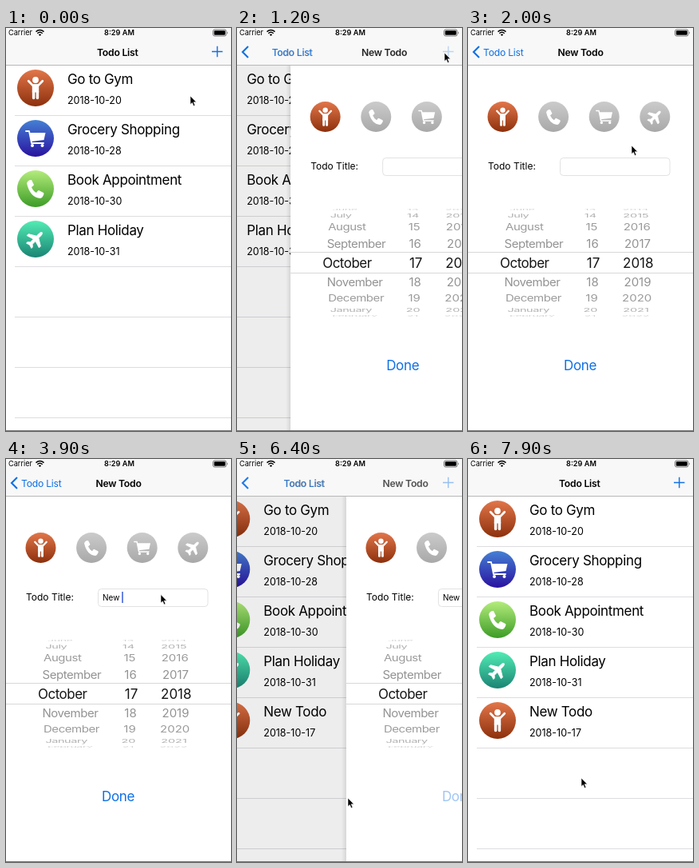
An HTML page that plays this animation: 282x504 px, repeating every 8 s.

```html
<!DOCTYPE html>
<html lang="en">
<head>
<meta charset="utf-8">
<title>Todo List</title>
<style>
  html, body { margin: 0; height: 100%; overflow: hidden; background: #fff; }
  svg { display: block; width: 100vw; height: 100vh; }
  text { font-family: Inter, Roboto, sans-serif; letter-spacing: -.02em; white-space: pre; }
  .plain { letter-spacing: 0; }
  .bold { font-weight: 600; }
  .mid { text-anchor: middle; }
</style>
</head>
<body>
<svg id="stage" viewBox="0 0 282 504"></svg>
<script>
const BLUE = '#0f70e4';
const WIDTH = 282;

const gradients = {
  person: ['#e2764a', '#8c300c'],
  cart: ['#4480d4', '#2a12a0'],
  phone: ['#b4ec7c', '#3c9c26'],
  plane: ['#52ecb4', '#1a8474'],
  gray: ['#cbcbcb', '#a8a8a8']
};

const glyphs = {
  person: `<circle cy="-10" r="3.9"/>
    <path d="M-8.8-8.8L-3.6-3.4H3.6L8.8-8.8" fill="none" stroke="#fff" stroke-width="2.8" stroke-linecap="round" stroke-linejoin="round"/>
    <path d="M-4.2-4.5h8.4v10h-8.4z"/>
    <path d="M-2.4 4v8.6M2.4 4v8.6" stroke="#fff" stroke-width="3.5" stroke-linecap="round"/>`,
  phone: '<path d="M-11-7q1-3 4-4l2 0 3 6q0 1-3 3 2 5 6 7 2-3 3-3l6 3q1 1 0 3-1 3-4 4-13-1-17-19z"/>',
  cart: `<path d="M-12-9h4l3 15h15" fill="none" stroke="#fff" stroke-width="1.8" stroke-linejoin="round" stroke-linecap="round"/>
    <path d="M-7.5-7H12.5L10.5 2-5.5 4z"/><circle cx="-4" cy="9" r="2"/><circle cx="8.5" cy="9" r="2"/>`,
  plane: '<path transform="rotate(45) scale(.9)" stroke="#fff" stroke-width="1" stroke-linejoin="round" d="M0-13q2 1 2 4v5l10 6v3l-10-3v6l3 3v2l-5-1.5-5 1.5v-2l3-3v-6l-10 3v-3l10-6v-5q0-3 2-4z"/>'
};

const text = (x, y, size, content, attrs = '') =>
  `<text x="${x}" y="${y}" font-size="${size}" ${attrs}>${content}</text>`;

const line = (x1, x2, y, color) =>
  `<path d="M${x1} ${y}H${x2}" stroke="${color}"/>`;

const icon = (name, x, y, radius, fill = name) =>
  `<g transform="translate(${x} ${y}) scale(${radius / 23})" fill="#fff">
    <circle r="23" fill="url(#${fill})"/>${glyphs[name]}</g>`;

const gradientDefs = Object.entries(gradients).map(([id, [top, bottom]]) =>
  `<linearGradient id="${id}" x2="0" y2="1"><stop stop-color="${top}"/><stop offset="1" stop-color="${bottom}"/></linearGradient>`).join('');

const todos = [
  ['person', 'Go to Gym', '2018-10-20'],
  ['cart', 'Grocery Shopping', '2018-10-28'],
  ['phone', 'Book Appointment', '2018-10-30'],
  ['plane', 'Plan Holiday', '2018-10-31'],
  ['person', 'New Todo', '2018-10-17']
];

const todoRows = todos.map(([name, title, date], i) =>
  `<g transform="translate(0 ${63 * i})" ${i === 4 ? 'id="added"' : ''}>
    ${icon(name, 37, 75, 23)}${text(77, 69.5, 17, title)}${text(77, 94.5, 12.5, date, 'class="plain"')}</g>`).join('');

const separators = Array.from({ length: 7 }, (_, i) => line(11, WIDTH, 109.5 + 63 * i, '#dddde0')).join('');

// Picker wheel: rows flatten and fade with distance from the selection.
const months = ['June', 'July', 'August', 'September', 'October', 'November', 'December', 'January', 'February'];
const wheel = [
  { dy: 0, squash: 1, size: 17, x: 40, shift: 0, color: '#151515' },
  { dy: 24, squash: .93, size: 15, x: 45.5, shift: 1, color: '#929292' },
  { dy: 44.5, squash: .78, size: 15, x: 47, shift: 2, color: '#9a9a9a' },
  { dy: 59, squash: .46, size: 14.5, x: 49.5, shift: 3.5, color: '#b0b0b0' },
  { dy: 66.5, squash: .16, size: 14.2, x: 52, shift: 4, color: '#d4d4d4' }
];
const pickerRows = months.map((month, i) => {
  const step = i - 4;
  const row = wheel[Math.abs(step)];
  const base = row.size * .36;
  const place = `translate(0 ${293.5 + Math.sign(step) * row.dy}) scale(1 ${row.squash})`;
  return `<g transform="${place}" fill="${row.color}">
    ${text(row.x, base, row.size, month, 'style="letter-spacing:-.03em"')}
    ${text(157 - row.shift, base, row.size, 17 + step, 'class="plain mid"')}
    ${text(213.3 - row.shift * .8, base, row.size, 2018 + step, 'class="plain mid"')}</g>`;
}).join('');

const formIcons = ['person', 'phone', 'cart', 'plane'].map((name, i) =>
  icon(name, 43.5 + 63.6 * i, 111, 19, i ? 'gray' : name)).join('');

const stage = document.getElementById('stage');
stage.innerHTML = `
  <defs>${gradientDefs}
    <linearGradient id="edge"><stop stop-opacity="0"/><stop offset="1" stop-opacity=".1"/></linearGradient>
  </defs>
  <g id="list">
    <rect width="282" height="504" fill="#fff"/>${separators}${todoRows}
  </g>
  <rect id="dim" width="282" height="504"/>
  <g id="form">
    <rect x="-6" width="6" height="504" fill="url(#edge)"/>
    <rect width="282" height="504" fill="#fff"/>
    ${formIcons}
    ${text(25, 177, 12, 'Todo Title:', 'class="plain"')}
    <rect x="115.5" y="162.5" width="137.5" height="22" rx="4" fill="#fff" stroke="#e2e2e2"/>
    ${text(121, 177, 10, '', 'id="typed" class="plain"')}
    <rect id="caret" y="166" width="1.6" height="14" fill="#4466dd"/>
    ${pickerRows}
    ${line(0, WIDTH, 280.5, '#d8d8d8')}${line(0, WIDTH, 306.5, '#d8d8d8')}
    ${text(120, 427.5, 17, 'Done', `id="done" fill="${BLUE}"`)}
  </g>
  <rect width="282" height="47" fill="#f8f8f8"/>
  ${line(0, WIDTH, 46.5, '#b8b8b8')}
  ${text(3, 9, 9.2, 'Carrier', 'class="plain"')}
  <g fill="none" stroke="#000" stroke-width="1.5">
    <path d="M37.5 4.6q5-4.2 10 0M39.3 6.7q3.2-2.8 6.4 0"/>
  </g>
  <path d="M40.8 8.2q1.7-1.4 3.4 0L42.5 10z"/>
  ${text(142, 9, 9.2, '8:29 AM', 'class="plain bold mid"')}
  <rect x="259.5" y="2" width="16.5" height="8" rx="2" fill="none" stroke="#555" stroke-width=".8"/>
  <rect x="260.8" y="3.3" width="14" height="5.4" rx="1"/>
  <path d="M277.3 4.5q1.8 1.5 0 3z" fill="#555"/>
  <path id="chevron" d="M14 23l-7 7 7 7" fill="none" stroke="${BLUE}" stroke-width="2.1"/>
  ${text(0, 34.5, 12.2, 'Todo List', 'id="listTitle" class="bold"')}
  ${text(0, 34.5, 12.2, 'Todo List', `id="backTitle" fill="${BLUE}"`)}
  ${text(0, 34.5, 12.2, 'New Todo', 'id="formTitle" class="bold mid"')}
  <path id="plus" d="M258 29.5h13.5M264.8 22.8v13.5" stroke="${BLUE}" stroke-width="1.4"/>
  ${line(0, WIDTH, 503.5, '#777')}
  <path id="cursor" d="M0 0v10.5l2.4-2.1 1.7 4.1 1.8-.8-1.7-4h3.3z" stroke="#fff" stroke-width=".6"/>`;

const el = Object.fromEntries([...stage.querySelectorAll('[id]')].map(node => [node.id, node]));

// Each stop: time, x, y of the pointer tip.
const pointerPath = [
  [0, 231, 85], [250, 242, 66], [500, 260, 31], [1500, 260, 31],
  [2000, 205, 147], [2300, 194, 169.5], [5000, 194, 169.5], [5500, 158, 352],
  [5700, 131, 430], [5900, 139, 424], [7700, 139, 424], [7900, 142, 399], [8000, 142, 399]
];

// Each entry: time, number of characters in the field.
const keystrokes = [[3500, 1], [3700, 2], [3800, 3], [3900, 4], [4100, 5], [4400, 6], [4500, 7], [4600, 8]];

const clamp = v => Math.min(1, Math.max(0, v));
const ease = (t, start, duration) => {
  const u = clamp((t - start) / duration);
  return u * u * (3 - 2 * u);
};

function pointerAt(t) {
  const i = pointerPath.findIndex(stop => stop[0] > t);
  const [t0, x0, y0] = pointerPath[i - 1];
  const [t1, x1, y1] = pointerPath[i];
  const u = (t - t0) / (t1 - t0);
  return [x0 + (x1 - x0) * u, y0 + (y1 - y0) * u];
}

function caretOpacity(t) {
  if (t < 2800 || t >= 5100) return 0;
  if (t >= 3100 && t < 3500) return t < 3200 ? .5 : 0;
  return 1;
}

const PUSH = 700, POP = 6000;
// 0 on the list, 1 on the form.
const transition = (t, delay, duration) => ease(t, PUSH + delay, duration) - ease(t, POP + delay, duration);
const shiftX = (node, x) => node.setAttribute('transform', `translate(${x} 0)`);
const fade = (node, opacity) => node.setAttribute('opacity', clamp(opacity));

function render(t) {
  const slide = transition(t, 145, 520);
  const nav = transition(t, 200, 450);

  shiftX(el.list, -85 * slide);
  shiftX(el.form, WIDTH * (1 - slide));
  fade(el.form, slide > 0 ? 1 : 0);
  fade(el.dim, .07 * clamp(slide * 3));
  fade(el.added, t >= POP ? 1 : 0);

  for (const title of [el.listTitle, el.backTitle]) title.setAttribute('x', 19 + 95 * (1 - nav));
  fade(el.listTitle, 1 - nav);
  fade(el.backTitle, nav * 1.25);
  el.formTitle.setAttribute('x', 141 + 168 * (1 - nav));
  fade(el.formTitle, nav * 1.15);
  fade(el.chevron, nav * 1.6);
  const pressed = t >= PUSH && t < 1500 ? .35 : 1;
  fade(el.plus, Math.min(pressed, 1 - nav));
  fade(el.done, t >= POP ? .4 : 1);

  const count = keystrokes.filter(([time]) => time <= t).length;
  el.typed.textContent = 'New Todo'.slice(0, count);
  el.caret.setAttribute('x', 121 + (count ? el.typed.getComputedTextLength() : 0));
  fade(el.caret, caretOpacity(t));

  el.cursor.setAttribute('transform', `translate(${pointerAt(t)})`);
}

function tick() {
  render(Math.floor(performance.now() % 8000 / 100) * 100);
  requestAnimationFrame(tick);
}
tick();
</script>
</body>
</html>
```
